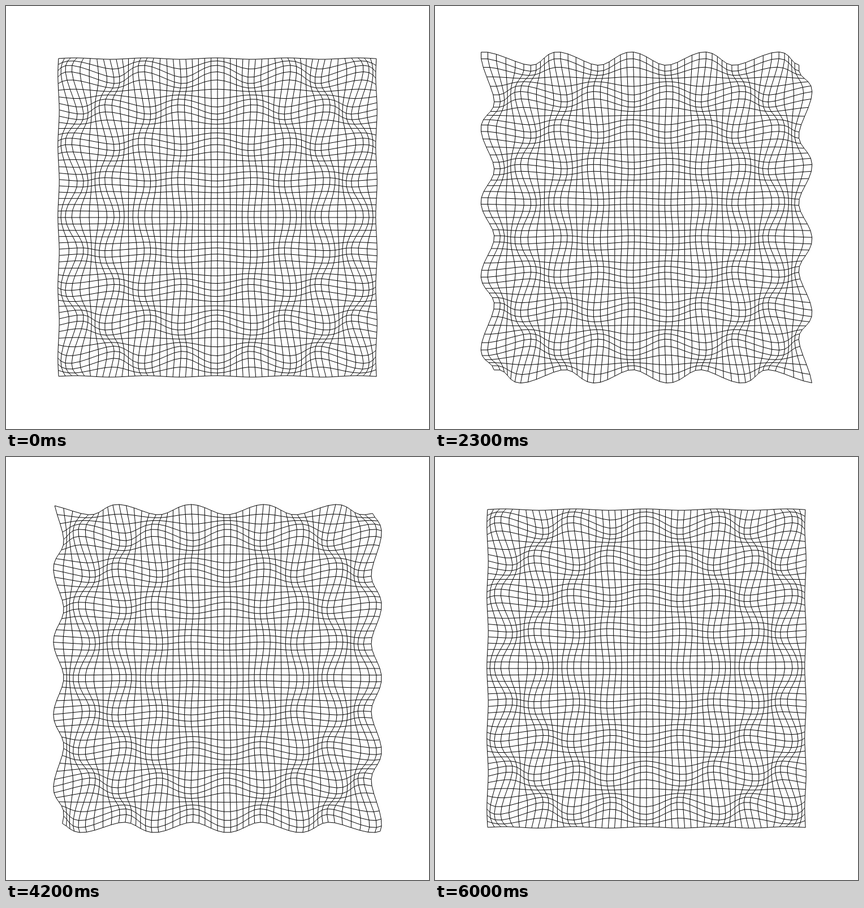
Write an HTML page with a canvas that moves like this. It is 748x748 px and loops after 6.1 s.

```html
<!DOCTYPE html>
<html lang="en">
<head>
<meta charset="utf-8">
<title>Rippling grid</title>
<style>
  html, body { margin: 0; width: 100%; height: 100%; overflow: hidden; background: #fff; }
  canvas { display: block; width: 748px; height: 748px; }
</style>
</head>
<body>
<canvas id="stage" width="748" height="748"></canvas>
<script>
const ctx = document.getElementById('stage').getContext('2d');
const SIZE = 748, MID = SIZE / 2;
const HALF = 281;             // half the side of the resting grid
const CELLS = 50;
const SWELL = 0.0435;         // strongest relative stretch
const FREQ = 4.5 * Math.PI;   // radians from the centre to an edge
const STEP = 100, STEPS = 61;
const PHASE = 0.1;

const unit = i => 2 * i / CELLS - 1;

// Each grid point is pushed away from or pulled towards the centre.
function place(i, j, phase) {
  const u = unit(i), v = unit(j);
  const wave = Math.cos(FREQ * u + phase) * Math.cos(FREQ * v + phase);
  const r = HALF * (1 + SWELL * wave);
  return [MID + u * r, MID + v * r];
}

function line(pointAt) {
  ctx.moveTo(...pointAt(0));
  for (let i = 1; i <= CELLS; i++) ctx.lineTo(...pointAt(i));
}

function draw(phase) {
  ctx.fillStyle = '#fff';
  ctx.fillRect(0, 0, SIZE, SIZE);
  ctx.strokeStyle = '#000';
  ctx.lineWidth = 1;
  ctx.beginPath();
  for (let n = 0; n <= CELLS; n++) {
    line(i => place(i, n, phase));
    line(i => place(n, i, phase));
  }
  ctx.stroke();
}

let shown = -1;
function tick() {
  const step = Math.floor(performance.now() / STEP) % STEPS;
  if (step !== shown) {
    shown = step;
    draw(PHASE + Math.PI * step / (STEPS - 1));
  }
  requestAnimationFrame(tick);
}
tick();
</script>
</body>
</html>
```
